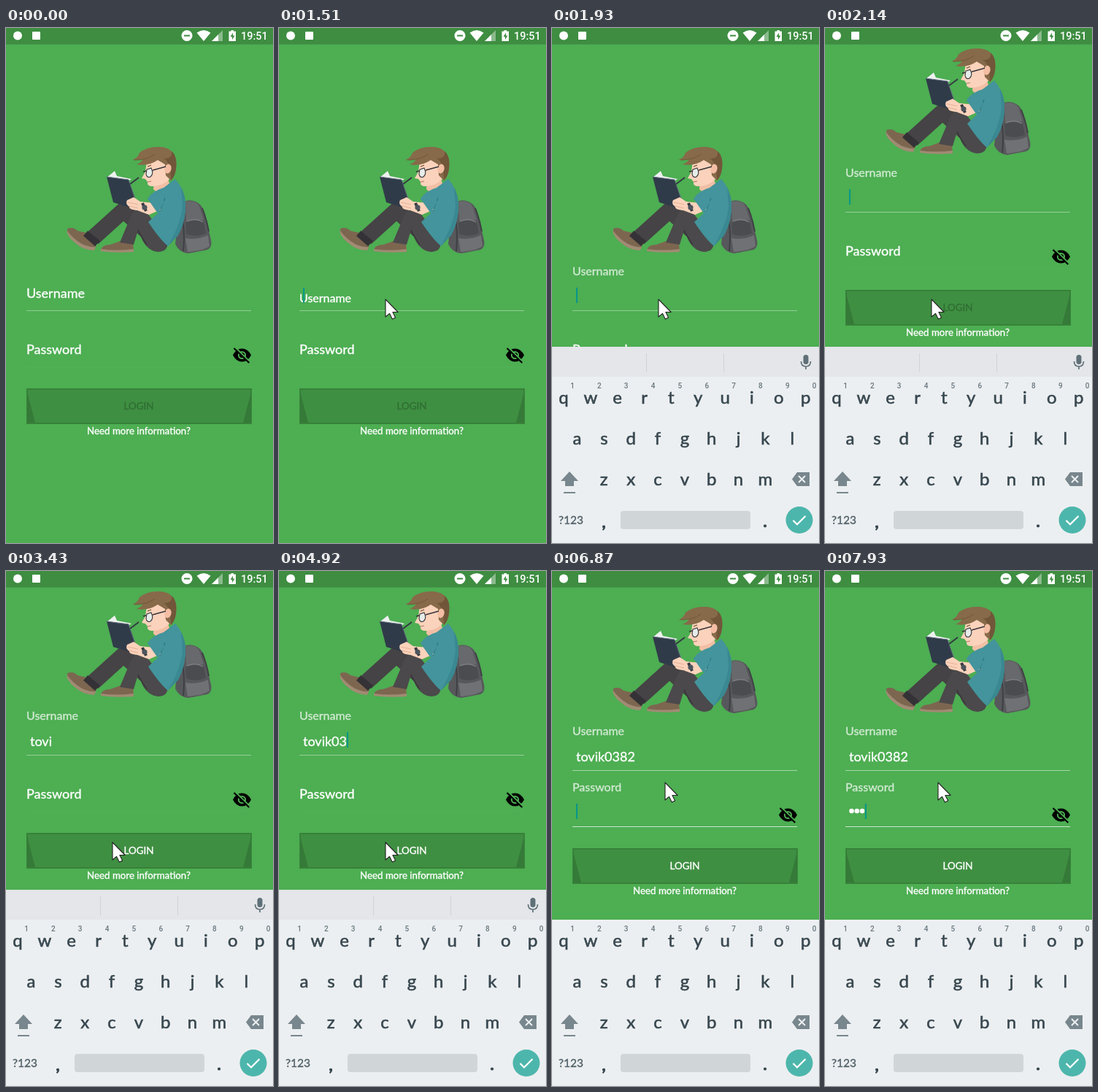
An HTML page that plays this animation: 366x706 px, repeating every 8000 ms.

```html
<!DOCTYPE html>
<html lang="en">
<head>
<meta charset="utf-8">
<title>Login</title>
<style>
html, body { margin: 0; width: 100%; height: 100%; overflow: hidden; background: #4dae52; }
svg { display: block; width: 100%; height: 100%; }
text { font-family: Lato, "Open Sans", sans-serif; color: #fff; fill: currentColor; stroke: currentColor; stroke-width: .35px; }
.keys text { color: #37474f; font-size: 24px; text-anchor: middle; stroke-width: .6px; }
.keys .num { font: 500 10px Roboto, sans-serif; color: #68777f; stroke: none; }
.keys .sym { font-size: 15.5px; color: #52626a; stroke-width: .4px; }
.mid { text-anchor: middle; }
.clock { font: 500 14.5px Roboto, sans-serif; stroke: none; }
</style>
</head>
<body>
<svg viewBox="0 0 366 706">
  <rect width="366" height="706" fill="#4dae52"/>

  <g id="page">
    <g id="reader">
      <!-- backpack -->
      <path d="M238 244Q245 234 257 237Q268 240 271 251L278 278L281 291Q283 301 276 304L250 309Q237 308 232 296Z" fill="#57585b"/>
      <path d="M246 238Q259 235 265 244L271 263L247 265Z" fill="#68696c"/>
      <path d="M246 267Q258 260 271 266L274 281Q260 288 247 282Z" fill="#4b4c50"/>
      <path d="M246 288Q262 291 277 284L279 299Q272 305 249 307Z" fill="#707174"/>
      <path d="M269 247Q275 262 278 279M240 254Q246 276 243 306" fill="none" stroke="#3f4044" stroke-width="2"/>
      <path d="M248 265Q259 260 270 266" fill="none" stroke="#808185" stroke-width="1.2"/>
      <!-- far leg and shoe -->
      <path d="M84 275Q92 272 98 278L111 281L124 297L121 304Q106 303 94 290Q83 283 84 275Z" fill="#7d6650"/>
      <path d="M83 277Q92 289 104 296Q114 301 123 300L121 305Q106 305 94 294Q83 285 83 277Z" fill="#a18b74"/>
      <path d="M119 288L161 250L208 292" fill="none" stroke="#454345" stroke-width="22" stroke-linejoin="round"/>
      <path d="M106 285L112 278L129 292L122 299Z" fill="#343236"/>
      <!-- near leg and shoe -->
      <path d="M130 304Q132 297 143 297L157 292L174 295L175 306Q150 309 130 304Z" fill="#7d6650"/>
      <path d="M130 303Q152 306 175 303V307Q150 309 130 306Z" fill="#a18b74"/>
      <path d="M156 294L172 256Q180 243 194 254L221 291Q224 306 209 307Q195 306 187 291L181 277L175 297Z" fill="#4b494b"/>
      <path d="M181 277Q187 289 193 297" fill="none" stroke="#353337" stroke-width="1.2"/>
      <!-- torso -->
      <path d="M203 207L220 200L226 220L212 230L202 221Z" fill="#f1bfa5"/>
      <path d="M194 234Q201 223 216 219L232 207Q243 219 246 239Q247 264 236 284L222 299Q211 290 195 266L209 253Z" fill="#43949c"/>
      <path d="M240 218Q245 228 246 239Q247 264 236 284L222 299Q240 268 242 244Z" fill="#3a8891"/>
      <path d="M211 251L218 233" stroke="#2f7882" stroke-width="1.2"/>
      <!-- book and pen -->
      <path d="M138 205L149 196L152 203L172 207L166 211Z" fill="#eef1ef"/>
      <path d="M138 204L168 208L178 237L166 245L147 239Z" fill="#303b49"/>
      <path d="M138 204L168 208L178 237" fill="none" stroke="#607080"/>
      <path d="M170 214L182 205" stroke="#333841" stroke-width="1.8"/>
      <!-- arms and watch -->
      <path d="M166 236L175 232L184 238L193 239L207 240L212 249L196 256L180 250Q168 249 169 245Q163 241 166 236Z" fill="#fbd2bb"/>
      <path d="M167 239L181 242M169 244L181 247" stroke="#dca88e" stroke-width=".8" fill="none"/>
      <path d="M194 234L207 226L217 238L208 254Z" fill="#43949c"/>
      <path d="M187 240L192 251" stroke="#34383f" stroke-width="4"/>
      <circle cx="190" cy="246" r="3.6" fill="#4c545d"/>
      <!-- head -->
      <path d="M193 183L220 178L228 202Q219 216 201 217Q193 217 194 211L191 207L186 206L191 197Z" fill="#fbd2bb"/>
      <path d="M173 181Q181 178 183 171Q194 162 211 163Q229 164 233 180Q235 200 226 209L219 202L218 187L208 181Q195 190 179 187Q186 184 188 180Z" fill="#876a49"/>
      <path d="M216 179Q226 183 226 209Q235 200 233 180Q231 172 227 169Q229 179 216 179Z" fill="#715639"/>
      <path d="M176 181Q194 181 204 173" fill="none" stroke="#715639"/>
      <ellipse cx="222" cy="193" rx="4.5" ry="6.5" fill="#f4bea4" transform="rotate(15 222 193)"/>
      <path d="M193 194L199 192Q203 200 198 204Q193 206 192 200Z" fill="#e6ece9" stroke="#353238" stroke-width="1.1"/>
      <path d="M201 195L219 190M188 197L192 196" stroke="#353238" stroke-width="1.3"/>
      <path d="M194 190L199 188" stroke="#6c4d2f" stroke-width="1.2"/>
      <path d="M194 211L199 210" stroke="#b87863"/>
    </g>

    <text id="userLabel" x="28">Username</text>
    <text id="user" x="33" y="374.5" font-size="18"></text>
    <rect id="userLine" x="28" y="387" width="308" height="1" fill="#fff"/>

    <text id="passLabel" x="28">Password</text>
    <g id="dots" fill="#fff">
      <circle cx="36.5" cy="443" r="3.3"/><circle cx="43.8" cy="443" r="3.3"/><circle cx="51" cy="443" r="3.3"/>
    </g>
    <rect id="passLine" x="28" y="464" width="308" height="1" fill="#fff"/>
    <rect id="caret" width="2" height="21" fill="#07968a"/>

    <g transform="translate(323.5 448.5)">
      <path d="M-12.5 0Q-8 -9 0 -9T12.5 0Q8 9 0 9T-12.5 0Z"/>
      <circle r="4.6" fill="none" stroke="#4dae52" stroke-width="2"/>
      <path d="M-9.3 -10.7L11.3 9.5" stroke="#4dae52" stroke-width="2"/>
      <path d="M-11 -9.6L9.8 10.6" stroke="#000" stroke-width="2.1"/>
    </g>

    <rect x="28" y="494" width="309" height="49" fill="#378139"/>
    <rect x="30" y="496" width="305" height="45" fill="#3f8f42"/>
    <path d="M29 499L40 541H29ZM336 499L325 541H336Z" fill="#357a38"/>
    <text id="login" class="mid" x="182" y="523" font-size="13.4">LOGIN</text>
    <text class="mid" x="182" y="557" font-size="13.3">Need more information?</text>
  </g>

  <g id="keyboard" class="keys">
    <g id="strip">
      <rect y="437" width="366" height="42" fill="#e4e6e9"/>
      <path d="M129.5 446V472M235.5 446V472" stroke="#d0d4d7"/>
      <rect x="344.5" y="448" width="7" height="13" rx="3.5" fill="#607078"/>
      <path d="M341.5 457Q341.5 464 348 464T354.5 457M348 464V468" fill="none" stroke="#607078" stroke-width="1.7"/>
    </g>
    <rect y="478" width="366" height="228" fill="#eceff1"/>
    <g id="letters"></g>
    <path d="M24 608L36 621H30V628H18V621H12ZM16 636H32V638H16Z" fill="#78878d"/>
    <path d="M336 609H353V628H336L329 618.5Z" fill="#78878d"/>
    <path d="M338 614L347 623M347 614L338 623" stroke="#eceff1" stroke-width="2"/>
    <text class="sym" x="26" y="680">?123</text>
    <text x="71" y="685" style="stroke-width:1.2px">,</text>
    <text x="292" y="684" style="stroke-width:1.2px">.</text>
    <rect x="94" y="662" width="178" height="25" rx="4" fill="#d0d5d8"/>
    <circle cx="339" cy="674.5" r="18.5" fill="#4db6ac"/>
    <path d="M330.5 675L336 680.5L347.500 669" fill="none" stroke="#fff" stroke-width="2.2"/>
  </g>

  <g id="status" fill="#fff">
    <rect width="366" height="22.5" fill="#3e8d41"/>
    <circle cx="16" cy="10.5" r="6"/>
    <rect x="36" y="5" width="11" height="11" rx="1"/>
    <circle cx="248" cy="10.5" r="7.5"/>
    <path d="M244 9.5H252V11.5H244Z" fill="#3e8d41"/>
    <path d="M261.5 6.5Q271 -.5 280.5 6.5L271 18Z"/>
    <path d="M297 3V18H282Z" opacity=".4"/>
    <path d="M291 9V18H282Z"/>
    <path d="M308.5 3H312V4.5H315V18H305.5V4.5H308.5Z"/>
    <path d="M311 6.5L307.5 12H310V16L313.5 10.5H311Z" fill="#3e8d41"/>
    <text class="clock" x="322" y="16">19:51</text>
  </g>

  <path id="mouse" d="M0 0V24L5.5 19.3L9.3 27L13.6 25L9.9 17.5H17.2Z" fill="#fff" stroke="#222" stroke-width="1.1" stroke-linejoin="round"/>
</svg>
<script>
const $ = id => document.getElementById(id);
const LOOP = 8000, NAME = "tovik0382";

// Each track lists [start time, value]; values hold until the next start.
const tracks = {
  mouse: [[0, null], [210, [224, 545]], [420, [198, 488]], [630, [166, 414]], [840, [146, 372]],
    [5790, [149, 342]], [6000, [155, 296]], [6210, [155, 290]]],
  scroll: [[0, 0], [2140, -135], [6870, -114]],
  drop: [[0, 270], [1720, 110], [1930, 0]],
  typed: [[0, 0], [2340, 1], [2550, 2], [2770, 4], [4080, 5], [4290, 6], [4730, 7], [4940, 8], [5150, 9]],
  dots: [[0, 0], [7530, 1], [7740, 2], [7930, 3]],
  caret: [[0, 0], [1290, 1], [3430, 0], [3860, 1], [5580, 0], [6210, 1], [7090, 0], [7530, 1]],
  // label: [baseline, font size, opacity]
  user: [[0, [370, 18, 1]], [1510, [376, 16, 1]], [1720, [350, 16, .85]], [1930, [339, 16, .75]]],
  pass: [[0, [447, 18, 1]], [6670, [440, 16, .9]], [6870, [416, 16, .75]]]
};

const at = (name, t) => tracks[name].filter(k => k[0] <= t).pop()[1];

function set(id, attrs) {
  for (const k in attrs) $(id).setAttribute(k, attrs[k]);
}

function addKey(label, x, y, cls) {
  const el = document.createElementNS("http://www.w3.org/2000/svg", "text");
  el.textContent = label;
  el.setAttribute("x", x);
  el.setAttribute("y", y);
  if (cls) el.setAttribute("class", cls);
  $("letters").append(el);
}

[["qwertyuiop", 16], ["asdfghjkl", 34.5], ["zxcvbnm", 71.3]].forEach(([row, x], r) =>
  [...row].forEach((c, i) => addKey(c, x + i * 36.85, 515 + r * 56)));
[..."1234567890"].forEach((c, i) => addKey(c, 28 + i * 36.85, 494, "num"));

function label(id, [y, size, opacity]) {
  set(id, { y, "font-size": size, opacity });
}

function draw(t) {
  const onPass = t >= 6670, typed = at("typed", t), dots = at("dots", t), pos = at("mouse", t);
  set("page", { transform: `translate(0 ${at("scroll", t)})` });
  set("keyboard", { transform: `translate(0 ${at("drop", t)})` });
  set("strip", { opacity: t < 6870 ? 1 : 0 });
  label("userLabel", at("user", t));
  label("passLabel", at("pass", t));

  $("user").textContent = NAME.slice(0, typed);
  [...$("dots").children].forEach((d, i) => d.setAttribute("opacity", i < dots ? 1 : 0));
  const width = onPass ? dots * 7.3 : typed ? $("user").getComputedTextLength() : 0;
  set("caret", { x: 33 + width, y: onPass ? 433 : 356, opacity: at("caret", t) });

  set("userLine", { opacity: onPass ? .5 : .4 });
  set("passLine", { opacity: onPass ? .7 : .03 });
  $("login").style.color = typed ? "#fff" : "#306f34";
  set("mouse", { opacity: pos ? 1 : 0, transform: `translate(${pos || [0, 0]})` });
}

const start = performance.now();
function tick() {
  draw((performance.now() - start) % LOOP);
  requestAnimationFrame(tick);
}
tick();
</script>
</body>
</html>
```
